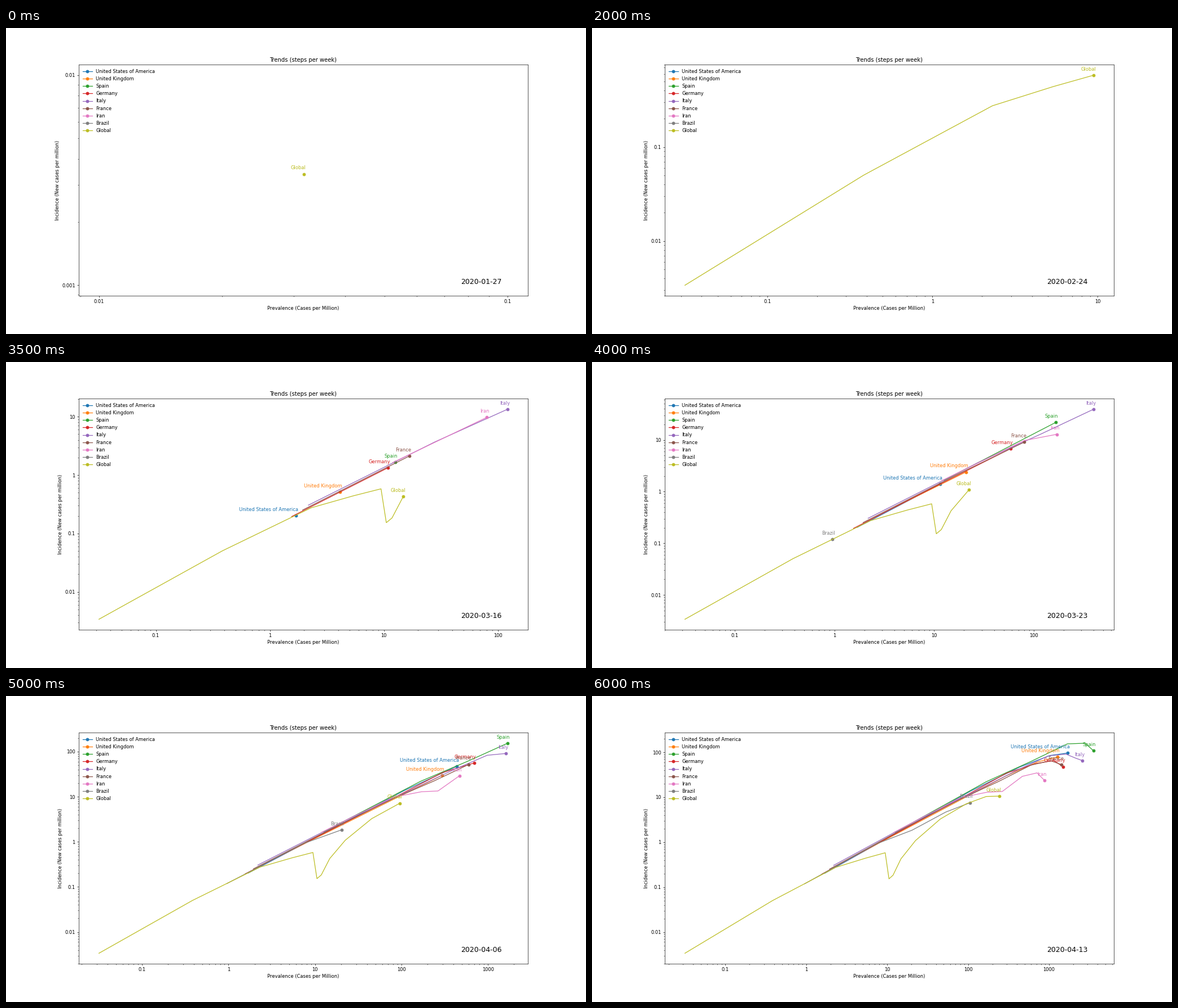
These frames come from a looping animation (1028x544 px, 10000 ms). A matplotlib script:

```python
import numpy as np
import matplotlib.pyplot as plt
from matplotlib.animation import FuncAnimation
from matplotlib.ticker import FuncFormatter, NullFormatter

W, H, DPI = 1028, 544, 60
STEP_MS, LOOP_MS = 500, 10000
LAST = 12

plt.rcParams.update({"font.family": "DejaVu Sans", "font.size": 10})

# First week shown, then weekly cases per million starting one week earlier.
CASES = {
    "United States of America": (7, [.272, 1.693, 11.53, 107.0, 437, 1032, 1706]),
    "United Kingdom": (7, [.54, 4.11, 20.9, 85.5, 293.6, 719, 1270]),
    "Spain": (7, [.96, 12.6, 166.2, 611.6, 1687, 2799, 3553]),
    "Germany": (6, [.193, 1.556, 10.88, 58.4, 298.7, 691, 1150, 1484]),
    "Italy": (5, [.045, 2.18, 27.95, 122, 398, 979, 1616, 2134, 2590]),
    "France": (6, [.179, 1.94, 16.7, 80.6, 236, 600, 1052, 1424]),
    "Iran": (6, [.526, 11.94, 80.3, 170.6, 264.5, 468.5, 712, 878]),
    "Brazil": (8, [.125, .956, 7.38, 20.3, 53.1, 106]),
    "Global": (0, [.008, .0317, .384, 2.31, 5.39, 9.46, 10.53, 11.82,
                   14.8, 22.4, 45.2, 95.3, 168, 242]),
}


def trend(name, week):
    """Prevalence and mean daily incidence up to the given week."""
    first, total = CASES[name]
    n = max(0, week - first + 1)
    return np.array(total[1:])[:n], (np.diff(total) / 7)[:n]


def log_limits(values, margin=.05):
    lo, hi = np.log10(min(values)), np.log10(max(values))
    if lo == hi:
        lo, hi = np.floor(lo), np.ceil(hi)
    pad = margin * (hi - lo)
    return 10 ** (lo - pad), 10 ** (hi + pad)


fig, ax = plt.subplots(figsize=(W / DPI, H / DPI), dpi=DPI, facecolor="white")
fig.subplots_adjust(left=.125, right=.9, bottom=.125, top=.88)


def draw(i):
    week = min(i, LAST)
    ax.clear()
    ax.set_xscale("log")
    ax.set_yscale("log")
    all_x, all_y = [], []
    for k, name in enumerate(CASES):
        x, y = trend(name, week)
        color = f"C{k}"
        ax.plot(x, y, "o-", color=color, label=name,
                markevery=[-1] if len(x) else None)
        if len(x):
            ax.annotate(name, (x[-1], y[-1]), xytext=(5, 10), ha="right",
                        textcoords="offset points", color=color)
        all_x.extend(x)
        all_y.extend(y)

    ax.set_xlim(log_limits(all_x))
    ax.set_ylim(log_limits(all_y))
    for axis in (ax.xaxis, ax.yaxis):
        axis.set_major_formatter(FuncFormatter(lambda v, _: f"{v:g}"))
        axis.set_minor_formatter(NullFormatter())

    ax.set_title("Trends (steps per week)")
    ax.set_xlabel("Prevalence (Cases per Million)")
    ax.set_ylabel("Incidence (New cases per million)")
    ax.legend(loc="upper left", frameon=False)
    date = np.datetime64("2020-01-27") + 7 * min(week, LAST - 1)
    ax.text(.85, .05, str(date), fontsize=15, transform=ax.transAxes)


anim = FuncAnimation(fig, draw, frames=LOOP_MS // STEP_MS, interval=STEP_MS,
                     repeat=True, repeat_delay=0)
plt.show()
```
